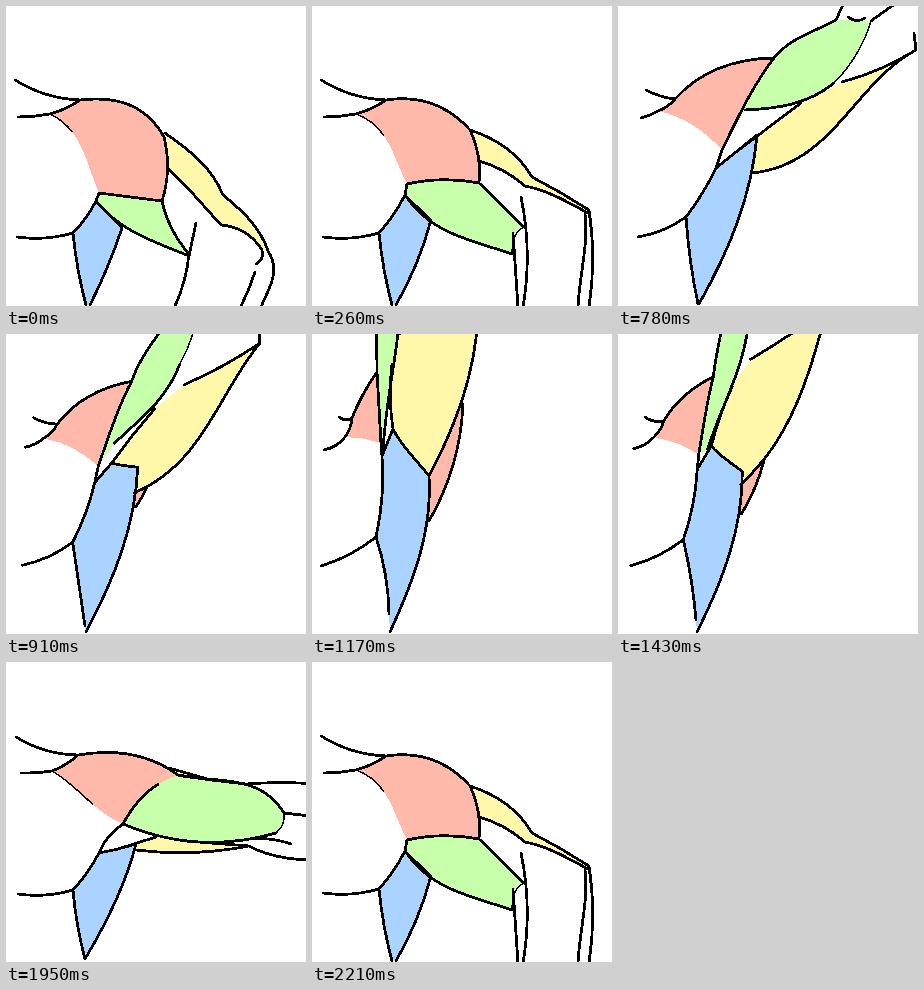
Animation, 300 px wide and 300 px high, one loop 2340 ms. Source, as an HTML page:

```html
<!DOCTYPE html>
<html lang="en">
<head>
<meta charset="utf-8">
<title>Shoulder study</title>
<style>
  html, body { margin: 0; width: 100%; height: 100%; overflow: hidden; background: #fff; }
  svg { display: block; width: 100vw; height: 100vh; }
  path { fill: none; stroke: #000; stroke-width: 2.8; stroke-linecap: round; stroke-linejoin: round; shape-rendering: crispEdges; }
  .thin { stroke-width: 1.5; }
  .partial { stroke-linecap: butt; }
  .fill { stroke: none; }
</style>
</head>
<body>
<svg id="stage" viewBox="0 0 300 300"></svg>
<script>
const TICK = 130;
const KEY_COUNT = 9;
const THIN = ['chest', 'elbow'];

// Each curve joins two joints; the third item is its usual bow in pixels.
const CURVES = {
  edge: ['edgeTop', 'edgeEnd'],
  trap: ['nape', 'collar', 6], neck: ['throat', 'pec', 1], clav: ['pec', 'collar', 2],
  delt: ['collar', 'shoulder'], rim: ['shoulder', 'notch'], base: ['pit', 'notch'],
  chest: ['pec', 'pit'], armpit: ['tuck', 'pit'],
  upper: ['notch', 'tip'], under: ['root', 'crook'], elbow: ['cusp', 'crook'],
  lat: ['back', 'waist', 4], flank: ['waist', 'tuck', 2],
  capIn: ['tuck', 'split'], capOut: ['split', 'heel'],
  sideL: ['waist', 'hip', 2], sideR: ['heel', 'hem'],
  ridge: ['split', 'peak'], crown: ['cuff', 'point'], belly: ['butt', 'point'],
  tri: ['cap', 'bend'], triArm: ['bend', 'wrist'], low: ['seam', 'dip'], lowArm: ['dip', 'hook'],
  palm: ['hook', 'thumb'], outer: ['wrist', 'outerEnd'], bone: ['boneTop', 'boneEnd'],
  inner: ['innerTop', 'innerEnd'], strap: ['strapTop', 'strapEnd'], crease: ['creaseL', 'creaseR']
};

// "-" walks a curve backwards
const FILLS = [
  ['#ffb9aa', 'edge belly'],
  ['#ffb9aa', 'clav delt rim -base -chest'],
  ['#fff8aa', 'tri triArm -lowArm -low'],
  ['#c8ffaa', 'base upper elbow -under'],
  ['#fff8aa', 'ridge crown -belly -capOut'],
  ['#aad4ff', 'capIn capOut sideR -sideL flank']
];

const lowered = {
  joints: {
    nape: [9, 74], throat: [12, 111], pec: [44, 108], collar: [74, 94], shoulder: [158, 131],
    notch: [156, 195], pit: [93, 187], tuck: [90, 195], root: [90, 195], tip: [183, 248],
    cusp: [183, 249], crook: [183, 250], split: [103, 209], heel: [116, 222],
    back: [11, 231], waist: [67, 227], hip: [80, 299], hem: [84, 299],
    cap: [159, 127], bend: [217, 189], wrist: [262, 245], seam: [161, 161], dip: [215, 219],
    hook: [256, 244], thumb: [250, 258], outerEnd: [255, 301], boneTop: [249, 266], boneEnd: [235, 300],
    innerTop: [183, 248], innerEnd: [169, 300], strapTop: [190, 217], strapEnd: [183, 250]
  },
  bows: {
    delt: [-18, -23], rim: -6, chest: [-20, -4], upper: 5, under: [14, 5], sideR: -2,
    tri: [-6, -11], triArm: [-5, -9], low: -1, lowArm: -8, palm: -4, outer: [-16, -5], bone: -1, inner: -3
  },
  ink: { chest: 0.3 }
};

const loose = {
  joints: {
    ...lowered.joints,
    shoulder: [158, 124], notch: [167, 177], pit: [95, 178], tuck: [93, 189], root: [93, 189],
    tip: [212, 221], cusp: [212, 221], crook: [200, 248], split: [104, 200], heel: [119, 214],
    cap: [158, 124], bend: [220, 171], wrist: [277, 204], seam: [167, 155], dip: [213, 180],
    hook: [276, 207], thumb: null, outerEnd: [277, 301], boneTop: [273, 208], boneEnd: [266, 301],
    innerTop: [201, 227], innerEnd: [206, 301], strapTop: [209, 191], strapEnd: [211, 301]
  },
  bows: {
    delt: -16, rim: -5, base: -5, chest: [-20, -4], under: [22, 7], elbow: [8, 4], sideR: -4,
    tri: [-9, -11], triArm: -1, low: -4, lowArm: [-5, -2], outer: -5, bone: [-6, 1], strap: -7
  },
  ink: { chest: 0.4 }
};

const level = {
  joints: {
    nape: [10, 75], throat: [15, 111], pec: [46, 109], collar: [72, 93], shoulder: [172, 113],
    notch: [172, 113], pit: [117, 162], tuck: [93, 191], root: [117, 162], tip: [278, 151],
    cusp: [278, 151], crook: [270, 171], split: [112, 187], heel: [130, 182],
    back: [12, 232], waist: [67, 228], hip: [79, 297], hem: [79, 297],
    cap: [163, 106], bend: [205, 118], wrist: [240, 122], seam: [172, 113], dip: [205, 118],
    hook: [240, 122], outerEnd: [330, 124], boneTop: [278, 151], boneEnd: [330, 157],
    innerTop: [243, 184], innerEnd: [330, 199], strapTop: [245, 177], strapEnd: [285, 182],
    peak: [150, 175], cuff: [180, 179], point: [243, 184], butt: [130, 188]
  },
  bows: {
    delt: [-13, -16], base: [-9, -11], chest: [-4, 8], armpit: -4, upper: [-4, -30], under: 18,
    elbow: -4, sideR: [-7, -5], belly: 6, outer: -3, inner: [10, 4], strap: -3
  },
  ink: { chest: 0.6, base: 0.72 }
};

const raised = {
  joints: {
    nape: [28, 84], throat: [23, 112], pec: [40, 105], collar: [57, 93], shoulder: [156, 52],
    notch: [156, 52], pit: [104, 144], tuck: [98, 162], root: [127, 104], tip: [218, 14],
    cusp: [253, 15], crook: [216, 77], split: [118, 146], heel: [139, 129],
    back: [20, 231], waist: [68, 211], hip: [80, 298], hem: [81, 298],
    wrist: [218, 14], outerEnd: [229, -10], boneTop: [253, 15], boneEnd: [285, -8],
    innerTop: [298, 44], innerEnd: [296, 27], peak: [183, 97], cuff: [224, 76], point: [298, 44],
    butt: [134, 167], edgeTop: [150, 155], edgeEnd: [136, 166], creaseL: [230, 11], creaseR: [247, 12]
  },
  bows: {
    trap: 2, delt: [-17, -14], base: [-2, -5], chest: [-9, -7], upper: [-9, -1], under: [8, 13],
    elbow: -6, sideR: [-15, -11], crown: 4, belly: [42, -11], crease: 4
  },
  ink: { chest: 0 }
};

const overhead = {
  joints: {
    nape: [27, 83], throat: [12, 116], pec: [33, 103], collar: [40, 84], shoulder: [65, 38],
    notch: [65, 38], pit: [69, 109], tuck: [70, 122], root: [71, 120], tip: [64, -90],
    cusp: [75, -120], crook: [88, -60], split: [81, 95], heel: [117, 142],
    back: [9, 232], waist: [64, 203], hip: [77, 280], hem: [78, 298],
    wrist: [64, -90], outerEnd: [64, -130], boneTop: [75, -120], boneEnd: [75, -150],
    innerTop: [165, -60], innerEnd: [165, -90], peak: [80, 30], cuff: [87, 0], point: [165, -60],
    butt: [117, 142], edgeTop: [151, 70], edgeEnd: [117, 187]
  },
  bows: {
    trap: 3, neck: 3, delt: -2, chest: -2, under: [-4, 10], flank: 4, capOut: [4, 0],
    ridge: -3, belly: [18, 24], sideL: -4, sideR: [-17, -10], edge: -10
  },
  ink: { chest: 0 }
};

const lerp = (a, b, t) => a.map((v, i) => v + (b[i] - v) * t);
const inkOf = (pose, name) => pose.ink[name] ?? 1;

function bowOf(pose, name) {
  const bow = pose.bows[name] ?? CURVES[name][2] ?? 0;
  return Array.isArray(bow) ? bow : [bow, bow];
}

function mix(a, b, t) {
  const pose = { joints: {}, bows: {}, ink: {} };
  for (const name in a.joints) {
    if (a.joints[name] && b.joints[name]) pose.joints[name] = lerp(a.joints[name], b.joints[name], t);
  }
  for (const name in CURVES) {
    pose.bows[name] = lerp(bowOf(a, name), bowOf(b, name), t);
    pose.ink[name] = lerp([inkOf(a, name)], [inkOf(b, name)], t)[0];
  }
  return pose;
}

// Cubic whose handles sit on the thirds of the chord, pushed sideways by the bow
function cubic(pose, name) {
  const [from, to] = CURVES[name].map(joint => pose.joints[joint]);
  if (!from || !to) return null;
  const [dx, dy] = [to[0] - from[0], to[1] - from[1]];
  const length = Math.hypot(dx, dy) || 1;
  const handles = bowOf(pose, name).map((bow, i) => {
    const [x, y] = lerp(from, to, (i + 1) / 3);
    return [x - dy / length * bow, y + dx / length * bow];
  });
  return [from, ...handles, to];
}

const svgPoint = p => p.map(v => v.toFixed(1)).join(' ');
const trace = ([start, ...rest], command = 'M') => command + svgPoint(start) + 'C' + rest.map(svgPoint).join(' ');

const stage = document.getElementById('stage');

function add(parent, tag, attrs) {
  const node = document.createElementNS('http://www.w3.org/2000/svg', tag);
  for (const key in attrs) node.setAttribute(key, attrs[key]);
  return parent.appendChild(node);
}

function drawFill(group, pose, color, route) {
  const parts = route.split(' ').map(step => {
    const points = cubic(pose, step.replace('-', ''));
    return points && step[0] === '-' ? points.reverse() : points;
  });
  if (parts.includes(null)) return;
  const d = parts.map((points, i) => trace(points, i ? 'L' : 'M')).join('') + 'Z';
  add(group, 'path', { class: 'fill', style: 'fill:' + color, d });
}

function drawCurve(group, pose, name) {
  const points = cubic(pose, name);
  const ink = inkOf(pose, name);
  if (!points || !ink) return;
  const path = add(group, 'path', { d: trace(points) });
  if (THIN.includes(name)) path.classList.add('thin');
  if (ink < 1) {
    path.classList.add('partial');
    path.setAttribute('pathLength', 1);
    path.setAttribute('stroke-dasharray', ink + ' 2');
  }
}

function draw(pose) {
  const group = add(stage, 'g', { visibility: 'hidden' });
  FILLS.forEach(([color, route], i) => {
    drawFill(group, pose, color, route);
    // The far edge stays behind the arm
    if (i === 0) drawCurve(group, pose, 'edge');
  });
  for (const name in CURVES) {
    if (name !== 'edge') drawCurve(group, pose, name);
  }
  return group;
}

const poses = [
  lowered, loose, mix(loose, level, 0.5), level, mix(level, raised, 0.5), raised,
  mix(raised, overhead, 1 / 3), mix(raised, overhead, 2 / 3), overhead
].map(draw);

// Up and back down, resting one extra tick at both ends
function poseAt(ms) {
  const tick = Math.floor(ms / TICK) % (2 * KEY_COUNT);
  return tick <= KEY_COUNT ? Math.max(0, tick - 1) : 2 * KEY_COUNT - tick;
}

const start = performance.now();

function loop() {
  const current = poseAt(performance.now() - start);
  poses.forEach((group, i) => group.setAttribute('visibility', i === current ? 'visible' : 'hidden'));
  requestAnimationFrame(loop);
}

loop();
</script>
</body>
</html>
```
